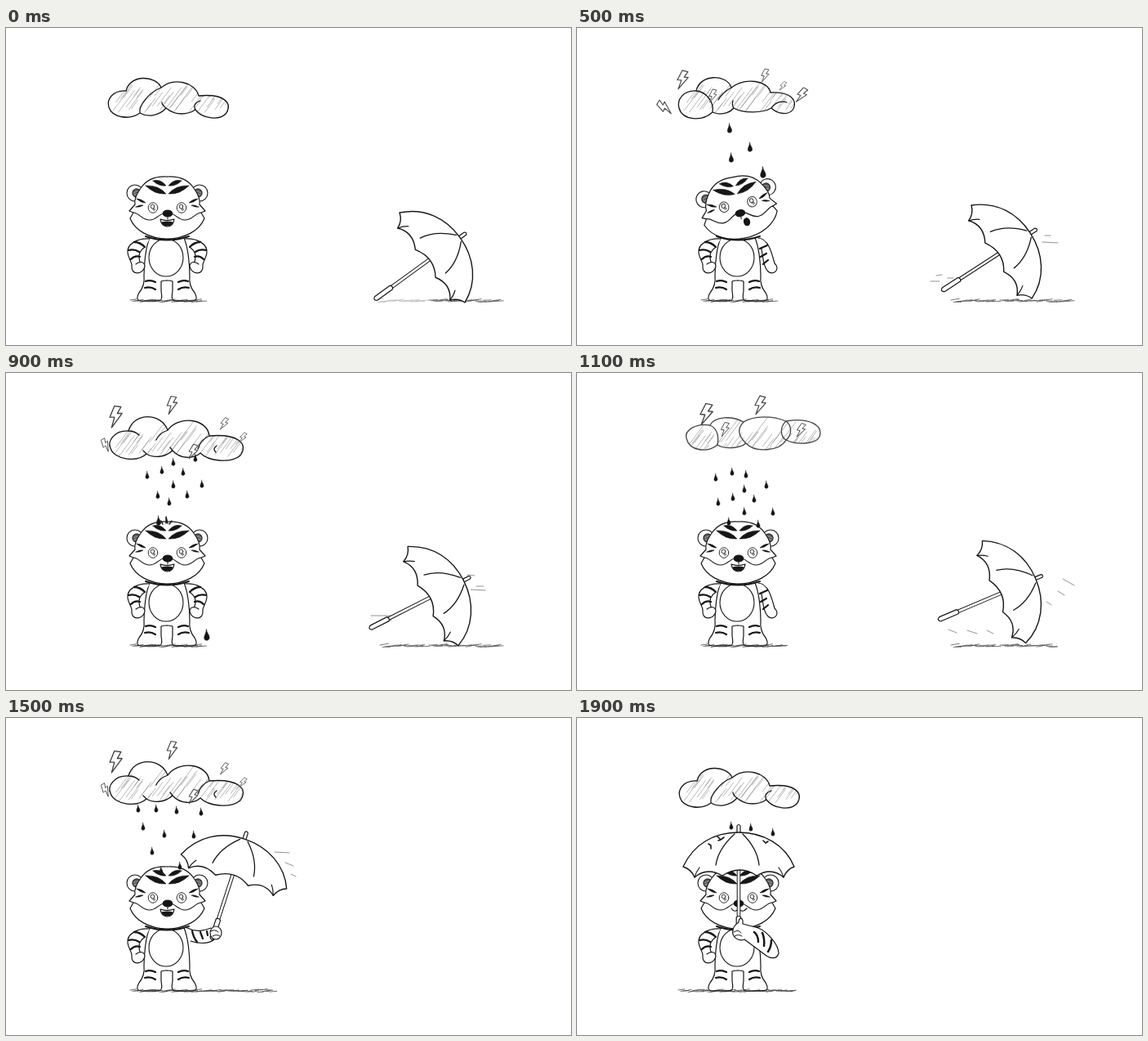
These frames come from a looping animation (692x388 px, 2 s). An HTML page with a canvas:

```html
<!DOCTYPE html>
<html lang="en">
<head>
<meta charset="utf-8">
<title>Tiger in the rain</title>
<style>
html, body { margin: 0; width: 100%; height: 100%; overflow: hidden; background: #fff; }
canvas { display: block; }
</style>
</head>
<body>
<canvas width="692" height="388"></canvas>
<script>
const ctx = document.querySelector('canvas').getContext('2d');
const INK = '#161616', GREY = '#777';
const STEP = 100, STEPS = 20;

function draw(d, { fill, stroke = INK, width = 1.2 } = {}) {
  const path = new Path2D(d);
  if (fill) { ctx.fillStyle = fill; ctx.fill(path); }
  if (stroke) { ctx.strokeStyle = stroke; ctx.lineWidth = width; ctx.stroke(path); }
}

function ellipse(x, y, rx, ry, fill, stroke = INK, width = 1.1) {
  ctx.beginPath();
  ctx.ellipse(x, y, rx, ry, 0, 0, Math.PI * 2);
  if (fill) { ctx.fillStyle = fill; ctx.fill(); }
  if (stroke) { ctx.strokeStyle = stroke; ctx.lineWidth = width; ctx.stroke(); }
}

function placed(x, y, degrees, scale, paint) {
  ctx.save();
  ctx.translate(x, y);
  ctx.rotate(degrees * Math.PI / 180);
  ctx.scale(scale, scale);
  paint();
  ctx.restore();
}

function mirrored(axis, paint) {
  paint();
  ctx.save();
  ctx.translate(2 * axis, 0);
  ctx.scale(-1, 1);
  paint();
  ctx.restore();
}

function seeded(seed) {
  return () => (seed = (seed * 16807) % 2147483647) / 2147483647;
}

// Pencil shading on the ground
function groundShadow(x1, x2, color = '#444', seed = 71) {
  const random = seeded(seed);
  let d = '';
  for (let x = x1; x < x2 - 8; x += 3) {
    d += `M${x},${333 + random() * 2.5}l${6 + random() * 5},${-1.8 * random()}`;
  }
  draw(d, { stroke: color, width: 0.8 });
}

const bolt = 'M-1,-11L-6,1L-1,1L-4,12L7,-3L2,-3L6,-10Z';

// Bolts are [x, y, degrees, scale]
const clouds = {
  calm: {
    outline: 'M147,77C130,76 123,88 126,97C130,110 152,113 164,104C174,110 188,107 196,98C208,108 223,106 232,100C240,111 262,114 270,104C277,92 268,80 236,83C232,66 205,60 190,73C184,58 152,56 147,77',
    inner: 'M164,104C162,94 177,78 190,73M196,98C192,95 191,93 191,91M232,100C229,95 232,91 238,89',
    bolts: []
  },
  swell: {
    outline: 'M149,82C138,76 130,84 134,97C139,112 160,112 174,106C180,103 184,96 186,91C192,105 226,109 237,96C246,110 272,110 283,98C292,86 288,64 276,60C264,55 252,57 246,58C230,48 206,53 190,68C172,60 154,66 149,82',
    inner: 'M190,68C187,76 190,84 186,91M149,82C153,82 155,84 156,87M237,96C243,88 245,80 243,74',
    bolts: [[119, 80, -45, .95], [188, 57, 10, .95], [281, 58, 12, .65], [310, 72, 28, .75], [226, 91, 8, .75]],
    color: '#555'
  },
  storm: {
    outline: 'M146,77C130,76 122,88 125,98C129,113 153,115 166,103C174,107 186,105 192,98C204,105 228,104 238,98C246,106 260,107 265,99C270,88 262,78 237,79C234,64 206,60 189,73C184,56 150,56 146,77',
    inner: 'M146,77C158,78 168,90 166,103M189,73C180,78 176,82 173,88M192,98C190,95 190,92 191,89M238,98C243,91 250,89 257,91',
    bolts: [[129, 63, 5, 1], [107, 97, -65, .9], [230, 58, 5, .7], [252, 71, 20, .5], [275, 82, 20, .85], [166, 83, 5, .7]]
  },
  wide: {
    outline: 'M150,71C132,70 124,84 128,92C132,106 160,110 172,99C180,104 194,104 204,95C214,106 230,105 238,98C248,108 275,111 287,101C297,86 284,74 249,77C247,56 212,51 198,70C190,48 156,48 150,71',
    inner: 'M150,71C156,71 160,73 163,76M172,99L168,95M198,70C190,73 186,77 184,82M249,77C242,80 237,86 235,93M204,95L201,91M257,97C254,94 254,92 258,89',
    bolts: [[134, 53, 0, 1.15], [203, 39, 0, .95], [267, 62, 15, .65], [290, 79, 20, .55], [122, 88, -40, .7], [229, 96, 10, .8]]
  },
  flat: {
    outline: 'M163,64C146,61 131,70 134,80C138,96 160,98 172,88C182,94 200,92 207,86C218,98 248,96 256,82C268,88 292,88 297,78C302,64 284,54 256,59C240,52 216,52 204,60C190,52 168,53 163,64',
    inner: 'M163,64C172,68 174,78 172,88M204,60C197,67 196,76 207,86M256,59C248,66 249,78 256,82M256,59C264,65 263,76 256,82',
    bolts: [[158, 50, 5, 1.15], [224, 39, 5, 1], [181, 69, 5, .75], [274, 70, 12, .75]],
    color: '#444'
  }
};

function drawCloud({ outline, inner, bolts, color = INK }) {
  ctx.save();
  ctx.clip(new Path2D(outline + 'Z'));
  const random = seeded(913);
  let d = '';
  for (let x = 128; x < 300; x += 3.2) {
    const y = 82 + random() * 22, length = 10 + random() * 20;
    d += `M${x},${y}l${length * .75},${-length}`;
  }
  draw(d, { stroke: '#999', width: 0.7 });
  ctx.restore();
  draw(outline + 'Z' + inner, { stroke: color, width: 1.3 });
  for (const [x, y, angle, scale] of bolts) {
    placed(x, y, angle, scale, () => draw(bolt, { fill: '#fff', stroke: '#444' }));
  }
}

function cloudAt(step) {
  if (step < 1 || step > 16) return clouds.calm;
  if (step < 4) return clouds.swell;
  if (step < 7) return clouds.storm;
  if (step < 10 || step > 12) return clouds.wide;
  return clouds.flat;
}

// Each drop passes (x, y) at the given step and falls `speed` pixels per step
const drops = [
  [5, [[187, 123, 14.5], [212, 146, 14.2], [189, 159, 20]]],
  [7, [[205, 104, 16.4], [186, 117, 16.2], [200, 125, 16.4], [222, 113, 18]]],
  [11, [[170, 128], [190, 121], [207, 124], [232, 137], [205, 142], [191, 152], [173, 158], [217, 154], [240, 170, 17]]],
  [15, [[162, 111], [184, 111], [209, 113], [239, 115], [168, 133], [194, 142], [230, 143], [179, 163], [213, 181, 20]]],
  [19, [[189, 132], [213, 134], [240, 140]]]
];

function drawDrop(x, y, scale = 1) {
  placed(x, y, 0, scale, () =>
    draw('M-.5,-6C0,-2 3,0 2.6,3C2,6 -2.5,6 -2.7,3C-2.8,0 -.5,-2 -.5,-6Z', { fill: INK, width: .5 }));
}

function drawRain(step) {
  const bottom = step > 16 ? 146 : 187;
  for (const [base, group] of drops) {
    for (const [x, y, speed = 16.4] of group) {
      const now = y + (step - base) * speed;
      if (now > 103.9 && now < bottom) drawDrop(x, now, base === 5 ? 1 : .8);
    }
  }
  if (step > 3 && step < 10) drawDrop(228 + (step - 5) * 4.5, 177 + (step - 5) * 36, 1.2);
  if (step > 6 && step < 10) draw('M192,185l-2,-4M196,184l0,-8l2,8M200,185l3,-4', { width: 1.4 });
  if (step > 16) draw('M172,145l4,4l4,-3M176,149l-3,1M161,154l3,2l0,4M228,150l3,3l3,-2', { width: 1.6 });
}

// [last step, centre x, centre y, degrees]
const umbrellaPoses = [
  [2, 522, 281, 54], [3, 521, 279, 55], [4, 520, 276, 56], [5, 520, 274, 57], [6, 522, 275, 58.5],
  [7, 523, 276, 59.5], [8, 523, 275, 61], [9, 523, 273, 63], [10, 523, 270, 65], [11, 523, 268, 67],
  [12, 519, 264, 67], [13, 508, 252, 66], [14, 330, 190, 35], [16, 279, 188, 18], [19, 198, 182, 0]
];

function drawUmbrella(step) {
  const [, x, y, angle] = umbrellaPoses.find(([last]) => step <= last);
  placed(x, y, angle, 1, () => {
    draw('M-1.8,0V62H1.8V0Z', { fill: '#fff', width: 1 });
    draw('M-2.8,62Q0,59 2.8,62V85Q0,90 -2.8,85Z', { fill: '#fff' });
    draw('M-2,-41V-50Q0,-53 2,-50V-41Z', { fill: '#fff' });
    draw('M-68,0C-55,-28 -30,-42 0,-42C30,-42 57,-27 68,0Q59,3 55,13Q40,0 22,11Q2,-3 -20,11Q-39,0 -54,13Q-58,3 -68,0Z',
      { fill: '#fff', width: 1.4 });
    draw('M-5,-40Q-25,-22 -28,-2M5,-40Q23,-22 25,-2', { width: 1.3 });
    draw('M-54,13Q-52,6 -48,1M55,13Q53,6 49,1');
  });
}

function windLines(step) {
  if (step < 3) return '';
  if (step < 7) return 'M570,262l19,1M573,254l7,0M433,310l11,0M440,303l7,-1M454,306l7,0';
  if (step < 10) return 'M565,247l9,1M569,265l18,1M576,261l9,0M447,297l24,0M460,303l12,0';
  if (step < 14) return 'M595,252l14,8M589,267l8,5M575,280l6,4M455,314l10,4M478,315l12,4M502,315l8,4';
  if (step < 17) return 'M329,164l18,1M342,177l10,4M349,191l6,3';
  return '';
}

function drawHead(step) {
  const tilt = { 4: -6, 5: -11, 6: -6 }[step] || 0;
  placed(197, 217, tilt, 1, () => {
    ctx.translate(-197, -217);
    mirrored(197.5, () => {
      ellipse(158, 202, 10, 10, '#fff');
      ellipse(160, 202, 5, 5, '#888', '#333', 1.4);
      draw('M156,200l6,-2M156,203l8,-3M158,206l6,-3', { stroke: '#333', width: .8 });
    });
    mirrored(197.5, () => {
      draw('M197.5,182C182,181 171,187 165,196C160,203 157,211 158,216L151,224L156,226L152,233C158,248 176,258 197.5,258', { fill: '#fff' });
      draw('M156,226C163,226 166,235 176,235C184,235 187,228 193,227');
      draw('M171,193Q187,192 196,203Q182,204 171,193ZM180,187Q189,184 196,193Q187,194 180,187ZM160,209Q166,209 171,214Q165,214 160,209ZM159,219Q164,216 168,217Q163,220 159,219Z', { fill: INK, width: .6 });
    });
    const lift = tilt ? -4 : step > 0 && step < 4 ? -4 : 0;
    for (const x of [180, 215]) {
      ellipse(x, 220 + lift, 5.8, 6.3, '#fff', '#333', 1);
      ellipse(x - .5, 218.5 + lift, 2.3, 2.5, '#fff', '#333', 1);
      ellipse(x + 1.2, 222 + lift, 1.2, 1.2, '#fff', '#333', .8);
    }
    ellipse(198, 227, 5.8, 4, INK);
    drawMouth(step, tilt);
  });
}

function drawMouth(step, tilt) {
  draw('M198,230V234', { width: 1 });
  if (tilt) ellipse(204, 239, 3.5, 4.5, INK);
  else if (step > 0 && step < 4) draw('M190,237Q196,233 202,234M194,237.5L201,236.5', { width: 1.8 });
  else if (step > 16) draw('M189,233Q193,239 198,234Q203,239 208,233');
  else {
    draw('M189,234Q197,237 206,234Q205,243 197,243Q190,242 189,234Z', { fill: '#fff' });
    draw('M191,238Q198,236 204,238Q202,242 197,242Q192,241 191,238Z', { fill: INK });
  }
}

function hipArm() {
  draw('M176,258C160,257 148,265 149,275C150,283 155,287 154,292C153,302 167,303 170,292C170,286 164,285 159,289M170,268C165,272 161,276 164,286', { fill: '#fff' });
  draw('M157,262Q164,262 170,268M150,272Q157,270 163,274M153,283Q158,278 164,280', { width: 2.3 });
}

function rightArm(step) {
  if (step < 1 || step > 6 && step < 10) {
    ctx.save();
    ctx.translate(395, 0);
    ctx.scale(-1, 1);
    hipArm();
    ctx.restore();
  } else if (step < 14) {
    draw('M222,257C234,258 238,273 242,288C250,295 240,304 234,298C229,293 228,284 226,270', { fill: '#fff' });
    draw('M224,270L233,266M225,280L232,276M228,289L234,284', { width: 2.2 });
  } else if (step < 17) {
    draw('M222,257C232,262 240,261 251,257M226,273C238,277 250,276 255,271');
    draw('M228,260Q229,268 234,274M238,262L241,270M246,261L247,266', { width: 2.2 });
    ellipse(257, 263, 7, 8, '#fff');
    draw('M251,261Q256,258 260,262M253,267Q258,264 262,267', { width: 1 });
  } else {
    draw('M222,257C234,262 247,278 247,288C245,295 238,295 232,291L205,271C198,274 189,268 191,260C191,254 196,252 198,250C198,243 204,244 203,252L222,257Z', { fill: '#fff' });
    draw('M217,262Q222,266 222,274M227,263Q230,270 229,279M238,272Q238,280 234,286', { width: 2.5 });
    draw('M192,262Q198,258 201,263M193,267Q198,264 202,267', { width: 1 });
  }
}

function drawBody() {
  mirrored(197, () => {
    draw('M176,257C171,268 169,290 169,303C170,312 168,318 163,324C159,331 161,334 166,334H186C192,334 191,328 190,322V310Q193,309 197,309');
    draw('M171,310Q177,308 183,311M170,318Q177,316 183,320', { width: 2.2 });
  });
  ellipse(196, 281, 21, 23, '#fff');
}

function drawGround(step) {
  if (step > 16) groundShadow(124, 272);
  else if (step > 13) groundShadow(152, 332);
  else groundShadow(152, step > 9 ? 257 : 245);
  if (step > 13) return;
  groundShadow(step < 3 ? 452 : 458, 520, step < 3 ? '#bbb' : '#555', 37);
  groundShadow(518, step > 9 ? 592 : 608, '#555', 53);
}

function render(step) {
  ctx.fillStyle = '#fff';
  ctx.fillRect(0, 0, 692, 388);
  drawCloud(cloudAt(step));
  drawGround(step);
  draw(windLines(step), { stroke: GREY, width: .8 });
  drawBody();
  hipArm();
  draw('M171,255Q197,264 224,255', { width: 2 });
  drawHead(step);
  drawUmbrella(step);
  rightArm(step);
  drawRain(step);
}

ctx.lineCap = ctx.lineJoin = 'round';
function tick() {
  render(Math.floor(performance.now() / STEP) % STEPS);
  requestAnimationFrame(tick);
}
tick();
</script>
</body>
</html>
```
